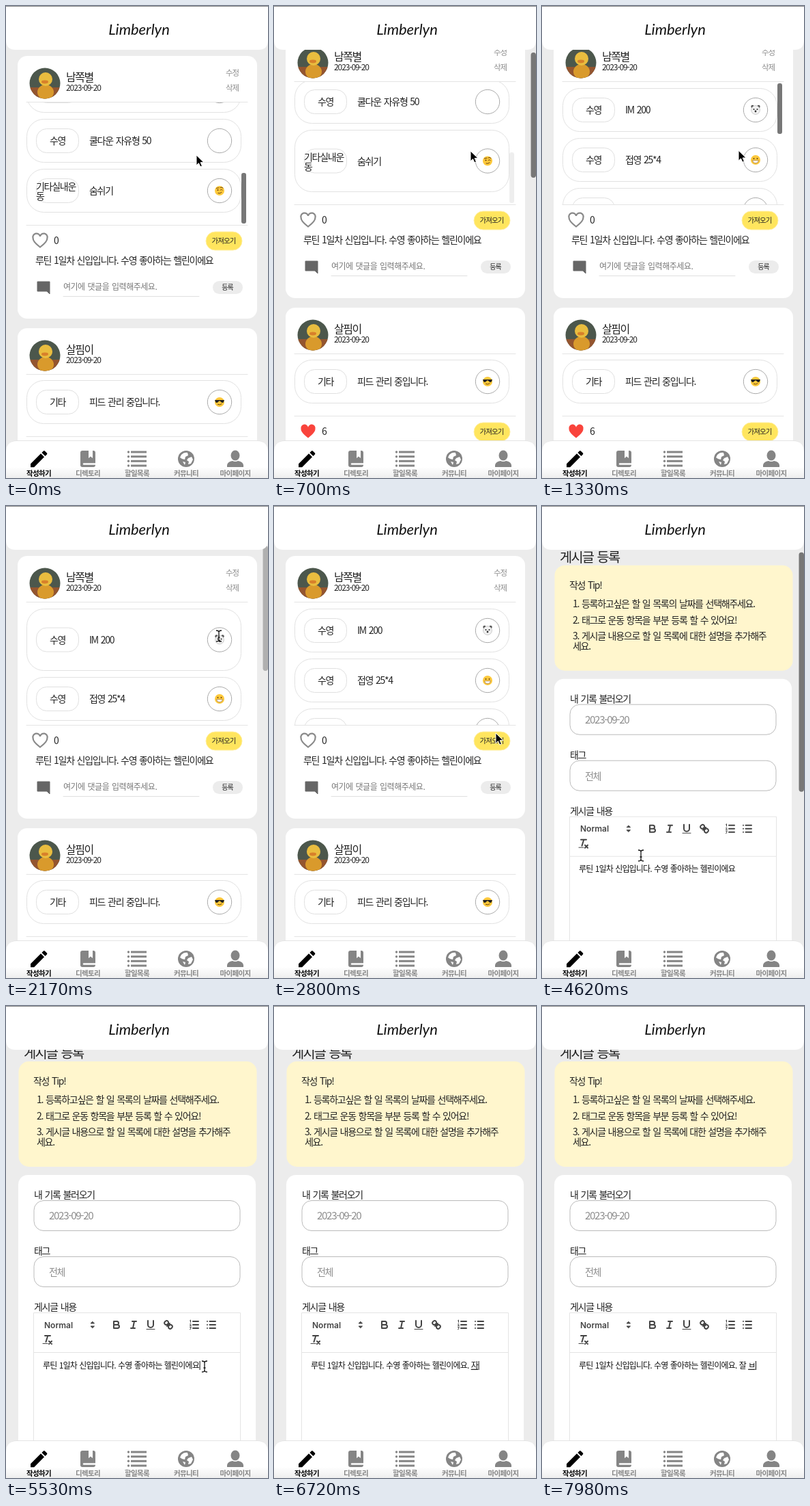
An HTML page that plays this animation: 384x690 px, repeating every 8 s.

```html
<!DOCTYPE html>
<html lang="ko">
<head>
<meta charset="utf-8">
<title>Routine feed</title>
<style>
html, body { margin: 0; width: 100%; height: 100%; overflow: hidden; background: #ececec; }
svg { display: block; width: 384px; height: 690px; }
text { font-family: "Noto Sans CJK KR", "Noto Sans CJK", sans-serif; letter-spacing: -.09em; word-spacing: .08em; fill: #222; white-space: pre; }
.mid { text-anchor: middle; }
.gray { fill: #8c8c8c; }
.med { font-weight: 500; }
.tab { font-weight: 700; letter-spacing: -.065em; fill: #858585; }
.on { fill: #000; }
.logo { font: italic 22px Lato, cursive; letter-spacing: 0; fill: #111; }
.ui { font: 600 12px Inter, sans-serif; letter-spacing: 0; fill: #444; }
.hint { letter-spacing: -.04em; fill: #777; }
.edit { font-weight: 500; letter-spacing: -.8px; word-spacing: .6px; fill: #111; }
.line { fill: none; stroke: #e4e4e4; }
.tool { fill: none; stroke: #444; stroke-width: 2; stroke-linecap: round; stroke-linejoin: round; }
.thin { stroke-width: 1; }
.solid { fill: #444; }
</style>
</head>
<body>
<svg id="stage" viewBox="0 0 384 690" xmlns="http://www.w3.org/2000/svg"></svg>
<script>
const stage = document.getElementById('stage');
const $ = id => document.getElementById(id);

// Text placed by its vertical centre
const txt = (x, cy, size, s, cls = '') =>
  `<text x="${x}" y="${cy + size * .36}" font-size="${size}" class="${cls}">${s}</text>`;
const box = (x, y, w, h, r, fill, stroke = 'none') =>
  `<rect x="${x}" y="${y}" width="${w}" height="${h}" rx="${r}" fill="${fill}" stroke="${stroke}"/>`;
const dot = (x, y, r, fill, more = '') => `<circle cx="${x}" cy="${y}" r="${r}" fill="${fill}" ${more}/>`;
const path = (d, fill, more = '') => `<path d="${d}" fill="${fill}" ${more}/>`;
const move = (x, y, body, id = '') => `<g ${id && `id="${id}"`} transform="translate(${x} ${y})">${body}</g>`;
const pen = (d, color, w = 1) => path(d, 'none', `stroke="${color}" stroke-width="${w}" stroke-linecap="round"`);

const yellow = dot(0, 0, 7, '#fdc93c');
const faces = {
  bear: dot(-4.5, -5, 2.2, '#555') + dot(4.5, -5, 2.2, '#555') +
    dot(0, 0, 6.4, '#f2f2f2', 'stroke="#aaa" stroke-width=".6"') +
    dot(-2.5, -1, 1.1, '#333') + dot(2.5, -1, 1.1, '#333') + dot(0, 2, 1.4, '#333'),
  grin: yellow + dot(-2.5, -2, 1, '#6b4210') + dot(2.5, -2, 1, '#6b4210') +
    path('M-4.5 .8H4.5Q4 4.8 0 4.8T-4.5 .8Z', '#fff', 'stroke="#8a5a1c" stroke-width=".6"'),
  wink: yellow + dot(-2.5, -1, 1.1, '#6b4210') +
    pen('M1-1Q2.5-2.6 4.2-1M-4.5-3.6L-1-4.2M1-4.6Q3-6 5-4M-2 3.6Q1 4.6 3 2.4', '#6b4210'),
  cool: yellow + path('M-7-3H7L5.6 .6Q3 2 .8-1.4H-.8Q-3 2-5.6 .6Z', '#222') +
    pen('M-2.6 3.4Q.4 5 3 2.8', '#6b4210'),
  none: ''
};

function item(id, y, tag, label, face) {
  const tags = tag.length > 5
    ? txt(44, -6, 14, tag.slice(0, 5)) + txt(44, 8, 14, tag.slice(5))
    : txt(75.5, 0, 14, tag, 'mid');
  return move(0, y, box(30.5, .5, 314, 63, 25, '#fff', '#e2e2e2') +
    `<g transform="translate(0 32)">${box(44.5, -17.5, 62, 35, 15, 'none', '#e0e0e0')}${tags}` +
    txt(122, 0, 14, label) + dot(313, 0, 17.7, '#fff', 'stroke="#aaa"') +
    move(313, 0, faces[face]) + '</g>', id);
}

const avatar = y => move(57, y, `<g clip-path="url(#round)">
  ${box(-23, -23, 46, 46, 0, '#4c574c')}${box(-23, 6, 46, 17, 0, '#94552f')}
  <ellipse cx="1" cy="13" rx="12" ry="11" fill="#d99a2c"/>${dot(1, -6, 10, '#e9bd3f')}
  <ellipse cx="0" cy="-2" rx="5" ry="2.4" fill="#d8802a"/></g>`);

const profile = (y, name) => avatar(y) + txt(88, y - 9, 16, name) + txt(88, y + 7, 12, '2023-09-20') +
  pen(`M30 ${y + 27.5}H354`, '#e4e4e4');

const heart = 'M0 9.5C-8 3-10.5 0-10.5-4A5.3 5.3 0 0 1 0-6.2A5.3 5.3 0 0 1 10.5-4C10.5 0 8 3 0 9.5Z';
const actions = (y, likes) => pen(`M30 ${y - 22.5}H354`, '#e4e4e4') +
  move(50, y, likes ? path(heart, '#f9443c') : path(heart, '#fff', 'stroke="#8a8a8a" stroke-width="2.2"')) +
  txt(70, y, 14, likes) + box(293, y - 13, 53, 27, 13.5, '#ffe55e', '#fff0a4') +
  txt(319, y, 10.5, '가져오기', 'mid med');

const routine = [
  ['수영', 'IM 200', 'bear'], ['수영', '접영 25*4', 'grin'], ['수영', '평영 25*4', 'none'],
  ['수영', '자유형 100', 'none'], ['수영', '쿨다운 자유형 50', 'none'], ['기타실내운동', '숨쉬기', 'wink']
];
const post = '루틴 1일차 신입입니다. 수영 좋아하는 헬린이에요';

const feed = `<g id="feed">
  ${box(17, 73, 351, 384, 14, '#fff')}${profile(113, '남쪽별')}
  ${txt(322, 98, 11.5, '수정', 'gray')}${txt(322, 120, 11.5, '삭제', 'gray')}
  <g clip-path="url(#list)">${routine.map((r, i) => item('item' + i, 0, ...r)).join('')}
  <rect id="listBar" x="345" width="7" height="74" rx="3" fill="#777"/></g>
  ${actions(343, 0)}${txt(43, 372, 14, post)}
  ${path('M46 403H64V421L60 417H46Z', '#666', 'stroke="#666" stroke-linejoin="round"')}
  ${txt(84, 411, 12, '여기에 댓글을 입력해주세요.', 'hint')}
  ${pen('M84 424.5H283', '#e0e0e0')}${box(303, 402, 44, 19, 9.5, '#ececec')}${txt(324.5, 411.5, 10, '등록', 'mid med')}
  ${box(17, 471, 351, 300, 14, '#fff')}${profile(511, '살핌이')}
  ${item('notice', 547, '기타', '피드 관리 중입니다.', 'cool')}${actions(652, 6)}
</g>`;

const tool = (x, y, body) => move(x - 9, y - 9, `<g class="tool">${body}</g>`);
const tools = [
  [127, 488, '<path class="solid thin" d="M6.5 11H11.5L9 13.5ZM6.5 7H11.5L9 4.5Z"/>'],
  [162, 488, '<path d="M5 4H9.5A2.5 2.5 0 0 1 9.5 9H5ZM5 9H10.5A2.5 2.5 0 0 1 10.5 14H5Z"/>'],
  [187, 488, '<path d="M7 4H13M5 14H11M8 14L10 4"/>'],
  [212, 488, '<path d="M5 3V9A4 4 0 0 0 13 9V3"/><path class="thin" d="M3 15.5H15"/>'],
  [238, 488, '<path d="M7 11L11 7M8.9 4.6A3.4 3.4 0 0 1 4.6 8.9C3.2 7.5 2 6.4 4.2 4.2S7.5 3.2 8.9 4.6ZM13.4 9.1A3.4 3.4 0 0 0 9.1 13.4C10.5 14.8 11.6 16 13.8 13.8S14.8 10.5 13.4 9.1Z"/>'],
  [276, 488, '<path d="M7 4H15M7 9H15M7 14H15"/><path class="thin" d="M2.5 3L3.5 2V5.5M2.5 8Q4.5 7 4 8.5L2.5 10.5H4.5M2.5 12.5H4.5L3.5 14Q5 15 2.5 15.8"/>'],
  [301, 488, '<path d="M6.5 4H15M6.5 9H15M6.5 14H15M3 4H3M3 9H3M3 14H3"/>'],
  [61, 510, '<path d="M5 3H13M6.5 12L9.3 3M11 11L15 15M15 11L11 15"/><path class="thin" d="M2 14.5H9"/>']
].map(a => tool(...a)).join('');

const field = (y, label, value, size) => txt(41, y - 8, 14, label) +
  box(41, y + .5, 302, 44, 14, '#fff', '#bbb') + txt(63, y + 23, size, value, 'gray');

const form = `<g id="form">
  ${txt(26, 91, 19.8, '게시글 등록')}${box(18.5, 103, 349, 154, 15, '#fff6cd')}
  ${txt(40, 132, 14, '작성 Tip!')}
  ${txt(45, 159, 14, '1. 등록하고싶은 할 일 목록의 날짜를 선택해주세요.')}
  ${txt(45, 183, 14, '2. 태그로 운동 항목을 부분 등록 할 수 있어요!')}
  ${txt(45, 206, 14, '3. 게시글 내용으로 할 일 목록에 대한 설명을 추가해주')}${txt(45, 221, 14, '세요.')}
  ${box(18, 269, 348, 500, 14, '#fff')}
  ${field(306, '내 기록 불러오기', '2023-09-20', 15.2)}${field(388, '태그', '전체', 14)}
  ${txt(41, 462, 14, '게시글 내용')}<path class="line" d="M40.5 750V470.5H343.5V750M40.5 528.5H343.5"/>
  <text x="56" y="492.5" class="ui">Normal</text>${tools}
  <text id="edit" class="edit" x="54" y="551.7" font-size="12"><tspan id="typed"></tspan><tspan id="draft" text-decoration="underline"></tspan></text>
  <rect id="caret" y="541" width="1" height="13" fill="#111"/>
</g>`;

const icons = [
  c => `<g transform="translate(-16 -16) scale(1.35)">${path('M3 17.2V21H6.8L17.8 9.9L14.1 6.2ZM20.7 7A1 1 0 0 0 20.7 5.6L18.4 3.3A1 1 0 0 0 17 3.3L15.1 5.1L18.9 8.9Z', c)}</g>`,
  c => box(-11, -12, 22, 24, 3, c) + path('M1-12H7V-1L4-3.5L1-1Z', '#fff') + pen('M-6 7.5H11', '#fff', 2.5),
  c => [-10, -3.3, 3.3, 10].map(y => dot(-12.5, y, 1.7, c) + box(-9, y - 1.5, 23, 3, 0, c)).join(''),
  c => dot(0, 0, 12, c) + path('M-7-6Q-3-10 2-9L3-5L-1-3L-2 1L-6 0L-9-2ZM3-1L8-3L10 1L7 7L3 8L4 4L1 2ZM-5 4L-1 5L-2 9Z', '#fff'),
  c => `<ellipse cy="-5" rx="6.5" ry="7.5" fill="${c}"/>` + path('M-12 12V9Q-11 4-4 3Q0 5 4 3Q11 4 12 9V12Z', c)
];
const nav = ['작성하기', '디렉토리', '할일목록', '커뮤니티', '마이페이지'].map((s, i) => {
  const x = 48 + 72 * i;
  return move(x, 662, icons[i](i ? '#858585' : '#000')) + txt(x, 683.5, 10.5, s, i ? 'mid tab' : 'mid tab on');
}).join('');

stage.innerHTML = `<defs>
  <clipPath id="round"><circle r="22.5"/></clipPath>
  <clipPath id="list"><rect x="28" y="141" width="328" height="179"/></clipPath>
  <linearGradient id="shade" x2="0" y2="1"><stop offset=".7" stop-color="#fff"/><stop offset="1" stop-color="#eee"/></linearGradient></defs>
  ${box(0, 0, 384, 690, 0, '#ececec')}${feed}${form}
  <rect id="pageBar" x="376.5" width="7.5" rx="3.7" fill="#777"/>
  ${path('M0 0H384V50Q384 64 370 64H14Q0 64 0 50Z', '#fff')}${box(0, 0, 384, 1, 0, '#8a8a8a')}
  <text x="195" y="42" class="logo mid">Limberlyn</text>
  ${path('M0 690V652Q0 635 17 635H367Q384 635 384 652V690Z', '#e4e4e4')}
  ${path('M0 690V652Q0 636 16 636H368Q384 636 384 652V690Z', 'url(#shade)')}${nav}
  <g id="cursor"><path id="arrow" d="M0 0V15L3.5 11.7L5.8 17L8.4 15.9L6.1 10.7H11Z" stroke="#fff"/>
  <path id="beam" d="M-4-8Q0-8 0-5.5Q0-8 4-8M0-6V6M-4 8Q0 8 0 5.5Q0 8 4 8M-1.5 2H1.5" fill="none" stroke="#111" stroke-width="1.3"/></g>`;

// Value of a [time, value] track with soft steps
function at(keys, t) {
  let [t0, v0] = keys[0];
  for (const [t1, v1] of keys) {
    if (t < t1) {
      const p = Math.max(0, (t - t0) / (t1 - t0));
      return v0 + (v1 - v0) * p * p * (3 - 2 * p);
    }
    [t0, v0] = [t1, v1];
  }
  return v0;
}

const tracks = {
  page: [[70, 0], [420, 30], [1330, 30], [1540, 0]],
  list: [[490, 277], [700, 304], [1330, 0]],
  growLast: [[490, 0], [700, 27], [910, 0]],
  growFirst: [[1890, 0], [2170, 27], [2310, 27], [2590, 0]],
  form: [[4480, 0], [4690, 22]],
  listBar: [[490, 1], [700, .12], [770, 1], [1820, 1], [2100, 0]],
  pageBar: [[70, 0], [140, 1], [700, 1], [980, 0], [1330, 0], [1400, 1], [2030, 1], [2170, .5], [2240, 0],
    [4480, 0], [4550, 1], [5040, 1], [5320, 0]],
  x: [[70, 279], [420, 288], [1820, 288], [2170, 312], [2310, 312], [2800, 325], [3500, 325], [3850, 174],
    [4060, 174], [4340, 145], [4760, 145], [5390, 291]],
  y: [[70, 218], [420, 212], [1820, 211], [2170, 190], [2310, 190], [2800, 332], [3500, 332], [3850, 303],
    [4060, 303], [4340, 511], [4760, 511], [5390, 527]]
};
const typing = [[0, '', ''], [6300, '. ', ''], [6650, '. ', 'ㅈ'], [6720, '. ', '자'], [7350, '. ', '잘'],
  [7700, '. 잘 ', ''], [7980, '. 잘 ', 'ㅂ']];

const shift = (el, x, y) => el.setAttribute('transform', `translate(${x} ${y})`);
const show = (el, on) => el.setAttribute('opacity', +on);
const within = (t, a, b) => t >= a && t < b;

function draw(t) {
  const v = {};
  for (const k in tracks) v[k] = at(tracks[k], t);
  const onForm = t >= 3220;
  show($('feed'), !onForm);
  show($('form'), onForm);
  shift($('feed'), 0, -v.page);
  shift($('form'), 0, -v.form);

  routine.forEach((_, i) => {
    const g = i === 0 ? v.growFirst : i === 5 ? v.growLast : 0;
    const el = $('item' + i);
    shift(el, 0, 150 + 73 * i - v.list + (i ? v.growFirst : 0));
    el.firstChild.setAttribute('height', 63 + g);
    shift(el.lastChild, 0, 32 + g / 2);
  });
  $('listBar').setAttribute('y', 143 + 101 * Math.min(1, v.list / 277));
  show($('listBar'), v.listBar);

  const bar = $('pageBar');
  bar.setAttribute('y', 58 + (onForm ? v.form * .6 : v.page / 3));
  bar.setAttribute('height', onForm ? 350 : 183);
  show(bar, v.pageBar);

  const [, typed, draft] = typing.filter(k => k[0] <= t).pop();
  $('typed').textContent = post + typed;
  $('draft').textContent = draft;
  $('caret').setAttribute('x', 54.6 + $('edit').getComputedTextLength());
  show($('caret'), t >= 5250 && !within(t, 7210, 7350));

  const beam = within(t, 2100, 2450) || t >= 4270;
  shift($('cursor'), v.x, v.y);
  show($('cursor'), t < 6300);
  show($('beam'), beam);
  show($('arrow'), !beam);
}

const start = performance.now();
function tick() {
  const t = (performance.now() - start) % 8000;
  draw(Math.floor(t / 70) * 70);
  requestAnimationFrame(tick);
}
tick();
</script>
</body>
</html>
```
